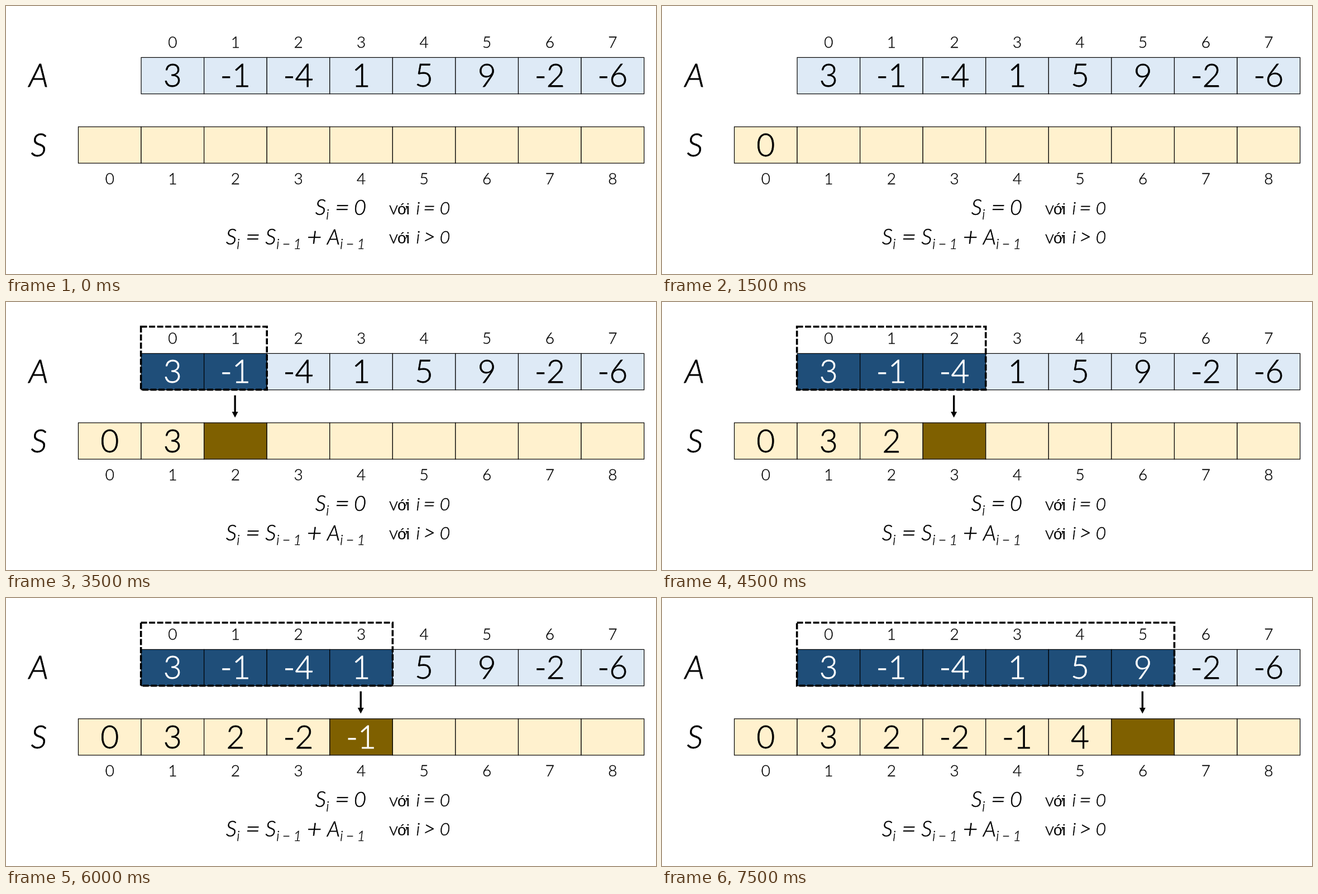
Animation, 1164 px wide and 481 px high, one loop 8 s. Source, as an HTML page with a canvas:

```html
<!DOCTYPE html>
<html lang="vi">
<head>
<meta charset="utf-8">
<title>Prefix sums</title>
<style>
  html, body { margin: 0; overflow: hidden; background: #fff; }
  canvas { display: block; }
</style>
</head>
<body>
<canvas id="stage" width="1164" height="481"></canvas>
<script>
const ctx = document.getElementById('stage').getContext('2d');
const LOOP = 8000, LEFT = 129.5, PITCH = 112.57, HEIGHT = 65.3;
const A_TOP = 92.4, S_TOP = 216.8;
const A = [3, -1, -4, 1, 5, 9, -2, -6];
const S = [0];
A.forEach((value, i) => S.push(S[i] + value));

const edge = col => LEFT + col * PITCH;
const middle = col => edge(col + 0.5);

// Step k fills S[k]; S[0] to S[filled - 1] show their numbers.
function stateAt(t) {
  if (t < 1000) return { step: -1, filled: 0 };
  if (t < 1500) return { step: 0, filled: 1 };
  if (t < 2500) return { step: -1, filled: 1 };
  const half = Math.floor((t - 2500) / 500);
  const step = 1 + Math.floor(half / 2);
  return { step, filled: step + half % 2 };
}

function text(str, x, y, size, { color = '#000', italic = false, align = 'center' } = {}) {
  ctx.font = `${italic ? 'italic ' : ''}300 ${size}px Lato, sans-serif`;
  ctx.textAlign = align;
  ctx.fillStyle = ctx.strokeStyle = color;
  ctx.lineWidth = size / 75;
  ctx.fillText(str, x, y);
  ctx.strokeText(str, x, y);
}

function cell(col, top, fill, label, color) {
  ctx.fillStyle = fill;
  ctx.strokeStyle = '#000';
  ctx.lineWidth = 1.2;
  ctx.fillRect(edge(col), top, PITCH, HEIGHT);
  ctx.strokeRect(edge(col), top, PITCH, HEIGHT);
  text(label, middle(col), top + 52.7, 57, { color });
}

function formulas() {
  const italic = (str, x, y, size) => text(str, x, y, size, { italic: true });
  const index = (x, y) => {
    italic('i', x, y, 25);
    italic('–', x + 15, y, 28);
    italic('1', x + 35, y, 25);
  };
  const condition = (sign, y) => {
    text('v', 686, y, 32, { align: 'left' });
    ctx.font = '28px "Liberation Sans", sans-serif';
    ctx.letterSpacing = '-2.5px';
    ctx.fillText('ới', 701, y);
    ctx.letterSpacing = '0px';
    italic('i', 738, y, 32);
    italic(sign, 758, y + 1, 38);
    italic('0', 786, y, 32);
  };

  italic('S', 563.5, 375, 39);
  italic('i', 576, 383, 25);
  italic('=', 602, 377, 46);
  italic('0', 634, 375, 38);
  condition('=', 374);

  italic('S', 403.5, 428, 39);
  italic('i', 416, 436, 25);
  italic('=', 442, 430, 46);
  italic('S', 474, 428, 39);
  index(487, 436);
  italic('+', 552, 430, 46);
  italic('A', 586.5, 428, 38);
  index(601, 436);
  condition('>', 426);
}

function selection(step) {
  const x = edge(1) - 0.4;
  ctx.strokeStyle = ctx.fillStyle = '#000';
  ctx.lineWidth = 3.6;
  ctx.setLineDash([10.9, 3.6]);
  ctx.strokeRect(x, 44.2, edge(step + 1) - x, 113.2);
  ctx.setLineDash([]);

  const tip = middle(step) - 0.8;
  ctx.fillRect(tip - 1.7, 167.5, 3.4, 30);
  ctx.beginPath();
  ctx.moveTo(tip - 5.5, 197);
  ctx.lineTo(tip + 5.5, 197);
  ctx.lineTo(tip, 207.5);
  ctx.fill();
}

function draw(t) {
  const { step, filled } = stateAt(t);
  ctx.fillStyle = '#fff';
  ctx.fillRect(0, 0, 1164, 481);
  text('A', 58.5, 145, 58, { italic: true });
  text('S', 59, 269.5, 58, { italic: true });

  A.forEach((value, i) => {
    const summed = i < step;
    cell(i + 1, A_TOP, summed ? '#1f4e79' : '#deeaf6', value, summed ? '#fff' : '#000');
    text(i, middle(i + 1), 75, 28);
  });
  S.forEach((value, i) => {
    const active = i === step;
    cell(i, S_TOP, active ? '#7f6000' : '#fff1ce', i < filled ? value : '', active ? '#fff' : '#000');
    text(i, middle(i), 320, 28);
  });
  formulas();
  if (step > 0) selection(step);
}

function tick() {
  draw(performance.now() % LOOP);
  requestAnimationFrame(tick);
}
tick();
</script>
</body>
</html>
```
